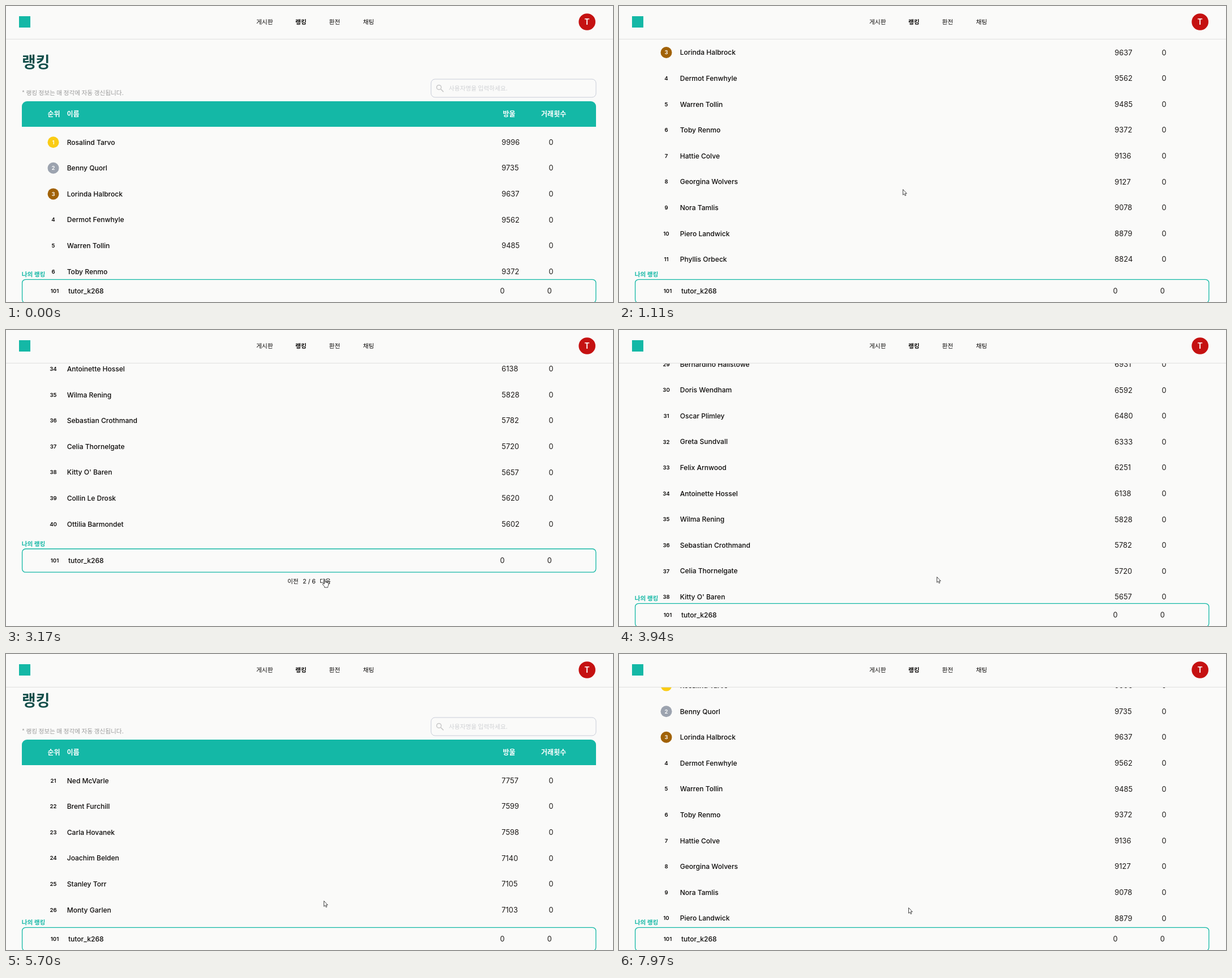
Animation of 1072 by 522 pixels, one loop 8000 ms. Source, as an HTML page with a canvas:

```html
<!DOCTYPE html>
<html lang="ko">
<head>
<meta charset="utf-8">
<title>랭킹</title>
<style>
html, body { margin: 0; width: 100%; height: 100%; overflow: hidden; background: #fafaf9; }
canvas { display: block; width: 1072px; height: 522px; }
</style>
</head>
<body>
<canvas id="stage"></canvas>
<script>
const W = 1072, H = 522, LOOP = 8000;
const ROW = 45.6, MAX_SCROLL = 764.4, PER_PAGE = 20;
const BG = '#fafaf9', TEAL = '#14b8a6', INK = '#0c0a09';
const FONT = 'Inter, "Noto Sans CJK KR", "Noto Sans CJK", sans-serif';
const KOREAN = '"Noto Sans CJK KR", "Noto Sans CJK", Inter, sans-serif';

const canvas = document.getElementById('stage');
const ctx = canvas.getContext('2d');
const dpr = window.devicePixelRatio || 1;
canvas.width = W * dpr;
canvas.height = H * dpr;

const names = `Rosalind Tarvo,Benny Quorl,Lorinda Halbrock,Dermot Fenwhyle,Warren Tollin,
Toby Renmo,Hattie Colve,Georgina Wolvers,Nora Tamlis,Piero Landwick,
Phyllis Orbeck,Jonty Ravell,Sabina Crowth,Ellis Mordane,Petra Vinslow,
Rufus Haddle,Imelda Strand,Corwin Basley,Tessa Oakrum,Alden Prewick,
Ned McVarle,Brent Furchill,Carla Hovanek,Joachim Belden,Stanley Torr,
Monty Garlen,Valentina Zabrolevski,Marlis Epton,Bernardino Hallstowe,Doris Wendham,
Oscar Plimley,Greta Sundvall,Felix Arnwood,Antoinette Hossel,Wilma Rening,
Sebastian Crothmand,Celia Thornelgate,Kitty O' Baren,Collin Le Drosk,Ottilia Barmondet`.split(/,\s*/);

const scores = [
  9996, 9735, 9637, 9562, 9485, 9372, 9136, 9127, 9078, 8879,
  8824, 8760, 8611, 8540, 8402, 8333, 8190, 8052, 7931, 7804,
  7757, 7599, 7598, 7140, 7105, 7103, 6992, 6955, 6931, 6592,
  6480, 6333, 6251, 6138, 5828, 5782, 5720, 5657, 5620, 5602
];
const medals = ['#facc15', '#9ca3af', '#a16207'];

// Spans of motion: start, end, number of steps
const spans = [
  [280, 490, 4], [690, 1390, 11], [1590, 2010, 7], [2210, 2970, 12],
  [3040, 3170, 3], [3520, 4710, 18], [5700, 6120, 7], [6320, 7090, 12],
  [7160, 7300, 3], [7560, 7970, 6]
];

const scrollKeys = [
  [620, 0], [690, 14], [1110, 249.4], [1320, 410], [1390, 425],
  [1520, 425], [1590, 445], [1940, 752], [2010, MAX_SCROLL],
  [3590, MAX_SCROLL], [3660, 745], [4430, 194.2], [4640, 18], [4710, 0],
  [5630, 0], [5700, 17], [6050, 695], [6120, 712],
  [6250, 712], [6320, 725], [6390, 757], [6460, MAX_SCROLL],
  [7480, MAX_SCROLL], [7560, 740], [7970, 184.6]
];

const cursorKeys = [
  [280, 832, 454], [350, 690, 396], [420, 552, 338], [490, 501, 323],
  [2140, 501, 323], [2280, 499, 328], [2560, 522, 378], [2970, 563, 440],
  [3450, 563, 440], [3590, 561, 435],
  [6250, 561, 435], [6530, 537, 461], [7090, 511, 447]
];

function snap(t) {
  const span = spans.filter(s => s[0] <= t).pop();
  if (!span) return 0;
  const [a, b, n] = span, step = (b - a) / (n - 1);
  return Math.min(b, a + Math.floor((t - a) / step + 1e-6) * step);
}

function track(keys, t) {
  const i = keys.findIndex(k => k[0] > t);
  if (i === 0) return keys[0].slice(1);
  if (i < 0) return keys[keys.length - 1].slice(1);
  const a = keys[i - 1], b = keys[i], f = (t - a[0]) / (b[0] - a[0]);
  return a.slice(1).map((v, j) => v + (b[j + 1] - v) * f);
}

function text(str, x, y, size, weight = 400, color = INK, align = 'left', family = FONT) {
  ctx.font = `${weight} ${size}px ${family}`;
  ctx.fillStyle = color;
  ctx.textAlign = align;
  ctx.fillText(str, x, y + size * 0.36);
}

function hangul(str, x, y, size, weight, color, align) {
  text(str, x, y, size, weight, color, align, KOREAN);
}

function disc(x, y, r, color) {
  ctx.fillStyle = color;
  ctx.beginPath();
  ctx.arc(x, y, r, 0, Math.PI * 2);
  ctx.fill();
}

function box(x, y, w, h, r, fill, stroke, line = 1) {
  ctx.beginPath();
  ctx.roundRect(x, y, w, h, r);
  if (fill) { ctx.fillStyle = fill; ctx.fill(); }
  if (stroke) { ctx.strokeStyle = stroke; ctx.lineWidth = line; ctx.stroke(); }
}

function drawSearch(y) {
  box(750.7, y - 16, 291.3, 32, 7, null, '#c9cdd8');
  ctx.strokeStyle = '#c8c8c8';
  ctx.lineWidth = 1.5;
  ctx.beginPath();
  ctx.arc(764.6, y - 1.6, 4, 0, Math.PI * 2);
  ctx.moveTo(767.6, y + 1.4);
  ctx.lineTo(772.6, y + 6.4);
  ctx.stroke();
  hangul('사용자명을 입력하세요.', 782, y, 10.7, 400, '#cfd1d4');
}

function drawTop(s) {
  hangul('랭킹', 28, 99.5 - s, 26.8, 700, '#134e4a');
  hangul('* 랭킹 정보는 매 정각에 자동 갱신됩니다.', 28, 153 - s, 10.7, 400, '#9b9b9b');
  drawSearch(145 - s);
  box(28, 168 - s, 1014, 45, [9, 9, 0, 0], TEAL);
  const y = 190.5 - s;
  hangul('순위', 73.5, y, 12.06, 700, '#fff');
  hangul('이름', 107.5, y, 12.06, 700, '#fff');
  hangul('방울', 877.5, y, 12.06, 700, '#fff');
  hangul('거래횟수', 945, y, 12.06, 700, '#fff');
}

function drawRows(s, page) {
  for (let i = 0; i < PER_PAGE; i++) {
    const y = 240.2 + i * ROW - s, n = page * PER_PAGE + i;
    if (y < 40 || y > H + 20) continue;
    if (medals[n]) disc(83.5, y, 10, medals[n]);
    text(n + 1, 83.5, y, 9.6, 600, medals[n] ? '#fff' : INK, 'center');
    text(names[n], 107.7, y, 12.06, 500);
    text(scores[n], 875.3, y, 12.9, 400, '#1c1917');
    text('0', 958.6, y, 12.9, 400, '#1c1917');
  }
}

function drawMine(s) {
  const y = Math.min(482.3, 386 + MAX_SCROLL - s);
  box(28.6, y, 1013.2, 41.2, 6, BG, TEAL, 1.3);
  hangul('나의 랭킹', 27.7, y - 9.3, 10.7, 700, TEAL);
  text('101', 86, y + 20.5, 9.6, 600, INK, 'center');
  text('tutor_k268', 110, y + 20.5, 12.06, 500);
  text('0', 872.6, y + 20.5, 12.9, 400, '#1c1917');
  text('0', 955.8, y + 20.5, 12.9, 400, '#1c1917');
}

function drawPager(y, page) {
  hangul('이전', 497, y, 10.7);
  text(`${page + 1} / 6`, 535.4, y, 10.7, 400, INK, 'center');
  hangul('다음', 554, y, 10.7);
}

function drawNav() {
  ctx.fillStyle = BG;
  ctx.fillRect(0, 0, W, 58);
  ctx.fillStyle = '#e0e0df';
  ctx.fillRect(0, 58, W, 1);
  ctx.fillStyle = TEAL;
  ctx.fillRect(23, 18, 20, 20);
  ['게시판', '랭킹', '환전', '채팅'].forEach((label, i) =>
    hangul(label, [442, 511, 570.5, 630.5][i], 28.5, 10.7, i === 1 ? 700 : 400));
  disc(1026.2, 28, 14.8, '#c51111');
  text('T', 1026.2, 28.2, 14, 600, '#fff', 'center');
}

function drawArrow(x, y) {
  const path = new Path2D('M.5 .5V10.2L2.7 8.2L4.2 11.6L5.8 10.9L4.3 7.6H7.2Z');
  paintCursor(path, x, y);
}

function drawHand(x, y) {
  const path = new Path2D('M-1 8V1Q-1 0 0 0Q1 0 1 1V5Q2.6 4 3.2 5.5Q4.6 4.8 5.1 6Q6.4 5.6 6.4 7V10Q6.2 11.5 5.3 12.5V14H-.5V12.5L-3.8 8.6Q-4 7.2-2.8 7.2Z');
  paintCursor(path, x, y);
}

function paintCursor(path, x, y) {
  ctx.save();
  ctx.translate(x, y);
  ctx.fillStyle = '#fff';
  ctx.strokeStyle = '#333';
  ctx.lineWidth = 0.9;
  ctx.lineJoin = 'round';
  ctx.fill(path);
  ctx.stroke(path);
  ctx.restore();
}

function drawCursor(t, pagerY) {
  const [x, y] = track(cursorKeys, t);
  const onButton = (x > 496 && x < 518) || (x > 553 && x < 575);
  if (onButton && Math.abs(y - pagerY) < 8) drawHand(x, y);
  else drawArrow(x, y);
}

function draw(now) {
  const t = snap(now % LOOP);
  const [s] = track(scrollKeys, t);
  const page = t >= 3100 && t < 7230 ? 1 : 0;
  const pagerY = 443 + MAX_SCROLL - s;

  ctx.setTransform(dpr, 0, 0, dpr, 0, 0);
  ctx.fillStyle = BG;
  ctx.fillRect(0, 0, W, H);
  drawTop(s);
  drawRows(s, page);
  drawMine(s);
  drawPager(pagerY, page);
  drawNav();
  if (t >= 280) drawCursor(t, pagerY);
}

function loop() {
  draw(performance.now());
  requestAnimationFrame(loop);
}
loop();
</script>
</body>
</html>
```
